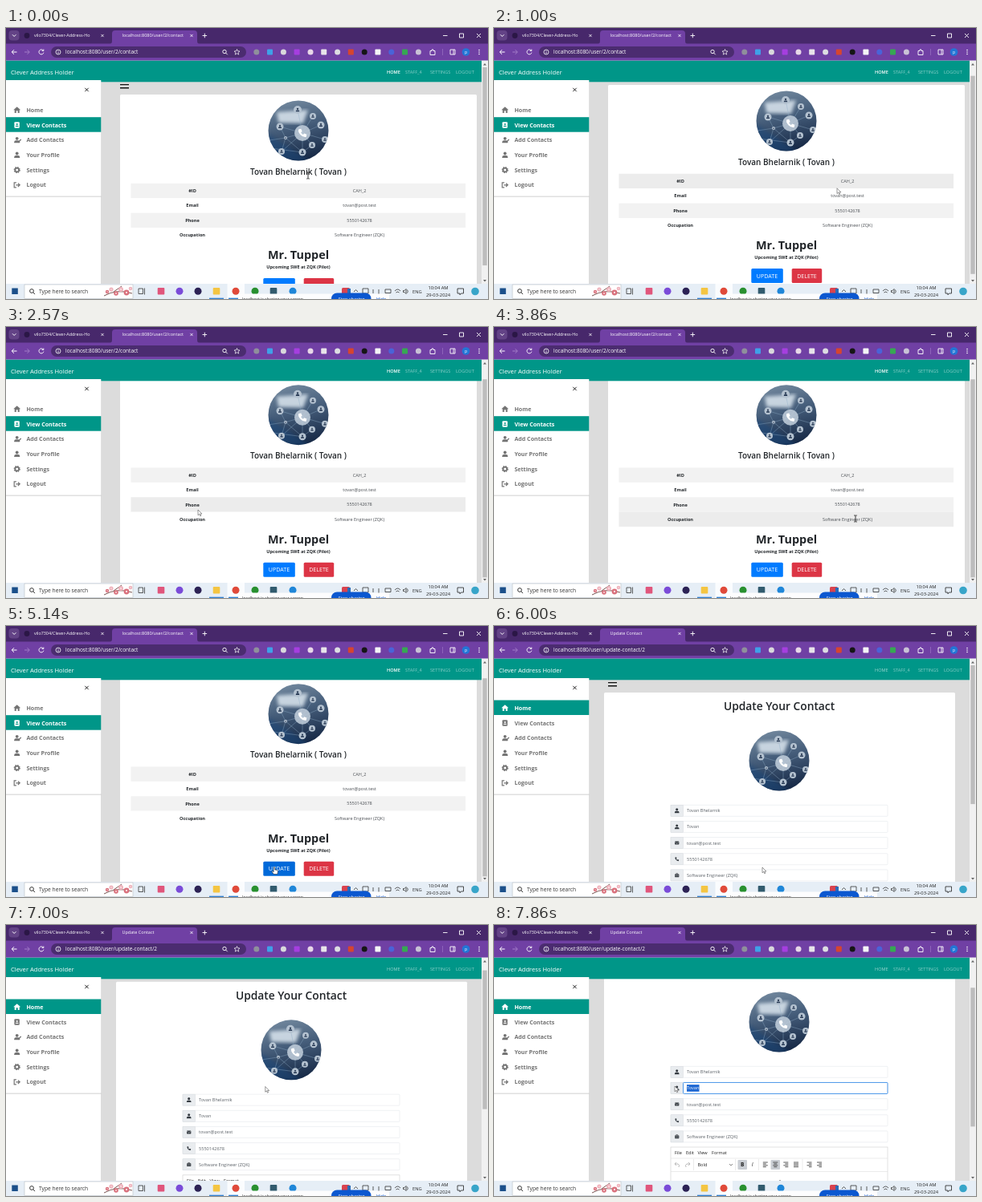
Write an HTML page that moves like this. It is 600 px wide and 338 px high and loops after 8 s.

```html
<!DOCTYPE html>
<html lang="en">
<head>
<meta charset="utf-8">
<title>Contact pages</title>
<style>
html, body { margin: 0; width: 100%; height: 100%; overflow: hidden; background: #fff; }
svg { display: block; width: 100%; height: 100%; }
text { font-family: "Open Sans", "Noto Sans", sans-serif; white-space: pre; }
</style>
</head>
<body>
<svg id="stage" viewBox="0 0 600 338"></svg>
<script>
const TEAL = '#009688', INK = '#212529', FRAME = '#47286b', BAR = '#7040a4';
const PERSON = { name: 'Tovan Bhelarnik', nick: 'Tovan', mail: 'tovan@post.test', phone: '5550142678', job: 'Software Engineer (ZQK)' };

// ---- drawing helpers ----
const rect = (x, y, w, h, fill, extra = '') => `<rect x="${x}" y="${y}" width="${w}" height="${h}" fill="${fill}" ${extra}/>`;
const disc = (x, y, r, fill, extra = '') => `<circle cx="${x}" cy="${y}" r="${r}" fill="${fill}" ${extra}/>`;
const line = (d, color, width = 0.8) => `<path d="${d}" fill="none" stroke="${color}" stroke-width="${width}"/>`;
const shape = (d, fill, extra = '') => `<path d="${d}" fill="${fill}" ${extra}/>`;
// y is the middle of the capitals
const text = (x, y, s, size, fill = INK, weight = 400, anchor = 'start', extra = '') =>
  `<text x="${x}" y="${(y + size * 0.36).toFixed(2)}" font-size="${size}" fill="${fill}" font-weight="${weight}" text-anchor="${anchor}" ${extra}>${s}</text>`;
const mid = (x, y, s, size, fill, weight) => text(x, y, s, size, fill, weight, 'middle');
const group = (id, body, extra = '') => `<g id="${id}" ${extra}>${body}</g>`;
const cross = (x, y, r, color, w) => line(`M${x - r} ${y - r}l${2 * r} ${2 * r}m0 ${-2 * r}l${-2 * r} ${2 * r}`, color, w);
const lens = (x, y, r, color) => line(`M${x - r} ${y}a${r} ${r} 0 1 0 ${2 * r} 0a${r} ${r} 0 1 0 ${-2 * r} 0M${x + r * 0.7} ${y + r * 0.7}l${r} ${r}`, color, 0.9);

const icons = {
  home: c => shape('M-4.5 0L0-4L4.5 0H3V3.7H1V1H-1V3.7H-3V0Z', c),
  book: c => {
    const inner = c === '#fff' ? TEAL : '#fff';
    return rect(-3.3, -3.8, 6.4, 7.6, c, 'rx="1"') + disc(0, -1, 1.1, inner) + rect(-1.8, 0.7, 3.6, 1.4, inner, 'rx=".7"');
  },
  person: c => disc(0, -1.9, 1.9, c) + shape('M-3.5 3.6V2.6Q-3.5.6-1.5.6H1.5Q3.5.6 3.5 2.6V3.6Z', c),
  edit: c => icons.person(c) + line('M1.5 3L5-.8', c, 1.4),
  gear: c => disc(0, 0, 2.4, 'none', `stroke="${c}" stroke-width="1.8"`) + disc(0, 0, 3.5, 'none', `stroke="${c}" stroke-width="1.3" stroke-dasharray="1.4 1.35"`),
  exit: c => line('M-.8-3H-3.5V3H-.8M-1.5 0H3M1.2-2.2L3.5 0L1.2 2.2', c, 1.2),
  mail: c => rect(-3.3, -2.5, 6.6, 5, c, 'rx=".6"') + line('M-3.3-1.5L0 .8L3.3-1.5', '#e9ecef', 0.6),
  phone: c => shape('M-2.7-2.8L-1-3.1L-.2-1.2L-1.1-.4Q-.5 .8.5 1.2L1.3.3L3.1 1.1L2.8 2.8Q1 3.6-1.4 1.3Q-3.6-1-2.7-2.8Z', c),
  job: c => rect(-3.3, -1.9, 6.6, 4.7, c, 'rx=".6"') + line('M-1.2-1.9V-2.9H1.2V-1.9', c) + line('M-3.3.6H3.3', '#e9ecef', 0.5),
};
const icon = (name, x, y, color, scale = 1) => `<g transform="translate(${x} ${y}) scale(${scale})">${icons[name](color)}</g>`;

// ---- profile picture: soft blue network, centred on 0,0 ----
function portrait(x, y) {
  const nodes = [[-1, -26, 5], [18, -18, 4], [28, -7, 4.5], [-23, -5, 4.5], [33, 11, 4], [17, 18, 4], [5, 27, 4.5], [-21, 26, 4], [-16, 9, 2]];
  const links = nodes.map(([a, b]) => `M5 3L${a} ${b}`).join('') + 'M-36 12L-16 9L5 27L17 18M-23-5L-16 9L-21 26M-34 22L5 27';
  return `<g transform="translate(${x} ${y})" clip-path="url(#round)">` +
    rect(-38, -38, 76, 76, 'url(#night)') +
    shape('M-27-23L12-26L6-9L-25-10Z', '#dbe6ef', 'opacity=".85" filter="url(#soft)"') +
    shape('M-38 4L14 38H-38Z', '#1d4a7c', 'opacity=".55" filter="url(#soft)"') +
    line(links, '#8fabc6', 0.4) +
    nodes.map(([a, b, r]) => disc(a, b, r, '#b4c2d0') + icon('person', a, b, '#2a3c57', r / 8)).join('') +
    disc(5, 3, 10, '#c3d0dd', 'opacity=".85"') + icon('phone', 5, 3, '#fff', 1.7) + '</g>';
}
const hamburger = line('M142 70.6H153M142 74.8H153', '#111', 1.4);

// ---- pages ----
const ROW = 18.4, ROWS_TOP = 193.8;
function contactPage() {
  const rows = [['#ID', 'CAH_2'], ['Email', PERSON.mail], ['Phone', PERSON.phone], ['Occupation', PERSON.job]];
  const table = rows.map(([head, value], i) => {
    const y = ROWS_TOP + i * ROW, fill = i % 2 ? '#fff' : '#f2f2f2';
    return rect(155.5, y, 416.5, ROW, fill, `class="row" data-fill="${fill}"`) +
      mid(232, y + 9.2, head, 5.6, INK, 700) + mid(440, y + 9.2, value, 5.5, '#4b4f54');
  }).join('');
  return rect(118, 60, 474, 300, '#dcdcdc') + hamburger + rect(142, 83, 444, 280, '#fff', 'rx="1.5"') +
    portrait(364, 128) + mid(364, 179, `${PERSON.name} ( ${PERSON.nick} )`, 10, INK, 600) + table +
    mid(364, 283, 'Mr. Tuppel', 14.4, INK, 700) +
    mid(364, 298.3, 'Upcoming SWE at ZQK (Pilot)', 5.6, INK, 700) +
    rect(320.3, 312, 39.5, 18, '#007bff', 'id="update" rx="1.5"') + mid(340, 321, 'UPDATE', 7.1, '#fff') +
    rect(370.7, 312, 37.5, 18, '#dc3545', 'rx="1.5"') + mid(389.5, 321, 'DELETE', 7.1, '#fff');
}

function updatePage() {
  const fields = [['person', PERSON.name], ['person', PERSON.nick], ['mail', PERSON.mail], ['phone', PERSON.phone], ['job', PERSON.job]];
  const inputs = fields.map(([name, value], i) => {
    const y = 230.3 + i * 20.15;
    return rect(220, y - 7, 270, 14, '#fff', 'rx="1" stroke="#dfe3e7" stroke-width=".5"') +
      rect(220, y - 7, 15.5, 14, '#e9ecef', 'stroke="#d5dade" stroke-width=".5"') +
      icon(name, 227.7, y, '#343a40', 0.8) + text(240, y, value, 5.6, '#5c6268');
  }).join('');
  const y = 250.45;
  const focus = group('focus', rect(235.5, y - 7, 254.5, 14, 'none', 'rx="1" stroke="#4c97ea" stroke-width="1"') +
    rect(240, y - 4.3, 0, 8.6, '#1b66d2', 'class="selection"') +
    text(240, y, PERSON.nick, 5.6, '#fff', 400, 'start', 'clip-path="url(#selected)"'));
  const bars = (x, short) => line([0, 1, 2, 3].map(i => `M${x + (i % 2 ? short[0] : 0)} ${343 + i * 1.9}h${i % 2 ? short[1] : 6}`).join(''), '#333', 0.8);
  const divider = x => line(`M${x} 339V353`, '#ddd', 0.6);
  const editor = rect(220, 324, 270, 70, '#fff', 'stroke="#ccc" stroke-width=".6"') +
    [['File', 225], ['Edit', 239], ['View', 253.5], ['Format', 271]].map(([s, x]) => text(x, 331.3, s, 5.6, '#222')).join('') +
    line('M220 338H490M220 354.5H490', '#ddd', 0.6) +
    line('M227 343L225 345L227 347M225 345H229Q231.5 346 230 349M242 343L244 345L242 347M244 345H240Q237.5 346 239 349', '#aaa', 0.8) +
    divider(248.5) + text(253.5, 346, 'Bold', 5.6, '#222') + line('M293 345l2 2l2-2', '#666', 0.8) + divider(300.5) +
    rect(303.5, 340, 11.5, 12, '#c9cdd3', 'rx="1"') + mid(309.3, 346, 'B', 6.5, '#222', 700) +
    text(321.7, 346, 'I', 6.5, '#222', 400, 'middle', 'font-style="italic"') + divider(329.5) +
    rect(344.5, 340, 11.5, 12, '#c9cdd3', 'rx="1"') +
    bars(334.8, [0, 4]) + bars(347.3, [1, 4]) + bars(360.3, [2, 4]) + bars(373, [0, 6]) + divider(384) +
    bars(389.5, [2.5, 3.5]) + bars(402, [2.5, 3.5]) + disc(356, 365.5, 0.6, '#333');
  return rect(118, 60, 474, 400, '#dcdcdc') + hamburger + rect(137, 83, 437, 360, '#fff', 'rx="1.5"') +
    mid(355, 100.5, 'Update Your Contact', 13.8, INK, 600) + portrait(355, 168) + inputs + focus + editor;
}

function sidebar(active) {
  const items = [['home', 'Home'], ['book', 'View Contacts'], ['edit', 'Add Contacts'], ['person', 'Your Profile'], ['gear', 'Settings'], ['exit', 'Logout']];
  return rect(0, 65, 118.3, 144.5, '#fff', 'filter="url(#shadow)"') + cross(100.5, 77, 2.2, '#222', 1) +
    items.map(([name, label], i) => {
      const y = 102.3 + i * 18.7, color = i === active ? '#fff' : '#747474';
      return (i === active ? rect(0, y - 9.8, 118.3, 18.5, TEAL) : '') + icon(name, 13.7, y, color) + text(25.4, y, label, 7.1, color, 700);
    }).join('');
}

function navbar(homeColor) {
  const dim = 'rgba(255,255,255,.55)';
  return rect(0, 40.5, 592, 26.8, TEAL) + text(6, 55.2, 'Clever Address Holder', 7.6, '#fff') +
    text(474, 55, 'HOME', 5.6, homeColor, homeColor === '#fff' ? 600 : 400) +
    text(497, 55, 'STAFF_4', 5.6, dim) + text(528, 55, 'SETTINGS', 5.6, dim) + text(560, 55, 'LOGOUT', 5.6, dim);
}

// ---- browser and desktop ----
function browser(title, url) {
  const extensions = ['#8f8f9c', '#3fa0e8', '#d9d9dc', '#a63ee0', '#e8d8e8', '#e8e4ea', '#dddde2', '#d6452f', '#151515', '#f4f4f6', '#4a63d8', '#36a853', '#c9c2d6'];
  return rect(0, 0, 600, 21, FRAME) + rect(0, 19.5, 600, 21, BAR) +
    rect(3.5, 3, 13, 12.5, '#634386', 'rx="4"') + line('M8 8.3l2.2 2.2l2.2-2.2', '#fff', 1) +
    disc(26, 9.5, 3.4, '#2b1746') + text(35, 9.5, 'vilo7304/Clever-Address-Ho', 5.4, '#fff') + cross(120, 9.5, 1.6, '#fff', 0.8) +
    shape('M129 20Q132 20 132 16V7Q132 3 136 3H234Q238 3 238 7V16Q238 20 241 20Z', BAR) +
    text(144.5, 9.5, title, 5.5, '#fff') + cross(231, 9.5, 1.6, '#fff', 0.8) +
    line('M244.5 9.5h5.6m-2.8-2.8v5.6M544 9.5h5.5M564.5 7h5v5h-5z', '#fff', 0.9) + cross(588.5, 9.5, 2.5, '#fff', 0.9) +
    line('M13.5 30H7.5M10 27.2L7.2 30L10 32.8', '#fff', 1) + line('M23 30H29M26.5 27.2L29.3 30L26.5 32.8', '#a27bc8', 1) +
    line('M46.3 28a3 3 0 1 0 .6 2.6M46.8 26.5V28.5H44.8', '#fff', 0.9) +
    rect(56, 23, 243, 14, '#4b2c70', 'rx="7"') + disc(65, 30, 3, 'none', 'stroke="#fff" stroke-width=".8"') + line('M65 29.5V32M65 28v.8', '#fff', 0.8) +
    text(74, 30, url, 6.5, '#fff') + lens(272, 29.5, 2.2, '#fff') +
    line('M287.5 26.5l1 2.3l2.5.2l-1.9 1.6l.6 2.5l-2.2-1.4l-2.2 1.4l.6-2.5l-1.9-1.6l2.5-.2z', '#fff', 0.7) +
    extensions.map((c, i) => i % 2 ? rect(325 + (i - 1) * 16.8, 26.5, 7, 7, c, 'rx="1"') : disc(311.8 + i * 16.8, 30, 3.5, c)).join('') +
    line('M528 28.5h2v-1.5h2v1.5h2v5h-6zM553 27h6v6h-6zM557 27v6', '#fff', 0.9) + line('M543.5 26V34', '#a27bc8', 0.6) +
    disc(572.5, 30, 4.8, '#2376d6') + mid(572.5, 30, 'p', 5, '#fff') + [27.5, 30, 32.5].map(y => disc(589, y, 0.8, '#fff')).join('');
}

function taskbar() {
  const apps = [[193, '#e0567c'], [216, '#7a4bd8'], [239, '#2c2255'], [262, '#f4c542'], [286, '#e04a3a'], [310, '#28902f'], [333, '#315b6e'], [357, '#1f86d8']];
  const blossoms = [[126, 329, 2.2], [131, 326, 2.6], [137, 331, 2.8], [143, 326, 3], [150, 330, 3.4], [155, 325, 2.3]];
  return rect(0, 319, 600, 19, '#e6eef6') + rect(7.3, 324.5, 7.5, 7.5, '#1b4f8a') +
    rect(23, 320, 135, 17.5, '#fff', 'stroke="#b9bec4" stroke-width=".6"') + lens(32, 328, 2.4, '#222') + text(41, 328.7, 'Type here to search', 6.7, '#333') +
    line('M122 334Q138 325 157 331M134 329L144 322', '#6b4340', 0.9) +
    blossoms.map(([x, y, r], i) => disc(x, y, r, i % 2 ? '#efb3bc' : '#d9707c') + disc(x, y, r / 3, '#fbe1e3')).join('') +
    line('M165 325h5.5v6.5h-5.5zM172.5 324.5v8', '#333', 0.8) + rect(275.5, 319, 21.5, 19, '#fafcfe') +
    apps.map(([x, c], i) => (i % 3 === 0 ? rect(x - 4.3, 324, 8.6, 8.5, c, 'rx="1"') : disc(x, 328.3, 4.5, c)) +
      (i > 2 ? rect(x - 9, 336.7, 18, 1.3, '#2f7fd0') : '')).join('') +
    rect(418, 324, 10, 8, '#d9434f', 'rx="1.5"') + rect(425, 325, 4, 7, '#2a6cb8') +
    line('M433 329l2.5-2.5l2.5 2.5M444 325h7v6h-7zM457 326v5M464 326v6M472 326h7v4.5h-7z', '#333', 0.8) +
    line('M484 328q3.5-4 7 0M485.5 330q2-2 4 0M494.5 327.5h1.5l2-2v6l-2-2h-1.5zM499.5 326.5q1.5 2 0 4', '#333', 0.8) +
    text(506, 328.5, 'ENG', 5.7, '#222') + mid(538, 324, '10:04 AM', 5.8, '#222') + mid(538, 333.4, '29-03-2024', 5.8, '#222') +
    line('M562 325h7.5v6h-3l-1.5 1.8v-1.8h-3z', '#222', 0.8) + disc(584, 328.5, 4.8, '#38a5c9') +
    rect(289, 331.5, 188, 10, '#fdfdfe', 'rx="2"') + text(294, 337.7, 'localhost is sharing your screen.', 5.2, '#333') +
    rect(405, 330.5, 49.5, 14, '#0b57d0', 'rx="7"') + mid(430, 338, 'Stop sharing', 5.6, '#fff') + text(461, 338, 'Hide', 5.6, '#0b57d0');
}

const cursors = {
  arrow: shape('M0 0V6.8L1.6 5.3L2.7 7.8L3.8 7.3L2.7 5H4.9Z', '#fff', 'stroke="#555" stroke-width=".6"'),
  beam: line('M-1.8-4H-.4L0-3.6L.4-4H1.8M0-3.6V3.6M-1.8 4H-.4L0 3.6L.4 4H1.8', '#222', 0.9),
  hand: shape('M-.8 0Q0-1 .8 0V3L3.6 3.7Q4.6 4 4.4 5.5L3.8 8.5H-.8L-3 5.3Q-2.8 4.3-1.7 5L-.8 5.7Z', '#fff', 'stroke="#333" stroke-width=".6"'),
};

// ---- scene ----
const stage = document.getElementById('stage');
stage.innerHTML = `<defs>
  <clipPath id="round"><circle r="37.5"/></clipPath>
  <clipPath id="view"><rect x="0" y="67" width="592" height="252"/></clipPath>
  <clipPath id="selected"><rect class="selection" x="240" y="244" width="0" height="13"/></clipPath>
  <linearGradient id="night" x1=".35" y1="0" x2=".6" y2="1"><stop stop-color="#71879d"/><stop offset=".45" stop-color="#445c79"/><stop offset="1" stop-color="#152744"/></linearGradient>
  <filter id="soft"><feGaussianBlur stdDeviation="2"/></filter>
  <filter id="shadow"><feDropShadow dx="0" dy=".8" stdDeviation=".6" flood-opacity=".3"/></filter>
</defs>` + rect(0, 0, 600, 338, '#fff') +
  `<g clip-path="url(#view)">${group('contactBody', contactPage())}${group('updateBody', updatePage())}</g>` +
  rect(592, 40.5, 8, 278.5, '#f1f1f1') + rect(593.3, 49, 5.4, 100, '#bdbdbd', 'id="thumb"') +
  shape('M594 46.5L596 44L598 46.5ZM594 314L596 316.5L598 314Z', '#666') +
  group('contactChrome', navbar('#fff') + sidebar(1) + browser('localhost:8080/user/2/contact', 'localhost:8080/user/2/contact')) +
  group('updateChrome', navbar('rgba(255,255,255,.6)') + sidebar(0) + browser('Update Contact', 'localhost:8080/user/update-contact/2')) +
  taskbar() + group('pointer', Object.entries(cursors).map(([id, body]) => group(id, body)).join(''));

// ---- motion ----
const LOOP = 8000, STEP = 1000 / 7, PAGE_SWITCH = 6000;
const scrollContact = [[857, 0], [1000, 12], [1143, 18.3]];
const scrollUpdate = [[6857, 0], [7290, 47]];
const pointerPath = [
  [0, 376, 184, 'beam'], [570, 376, 184, 'arrow'], [1000, 427, 199.8, 'arrow'], [1700, 350, 206, 'arrow'],
  [2571, 239, 228, 'arrow'], [3000, 262, 234, 'arrow'], [3700, 450, 239, 'beam'], [4290, 450, 239, 'beam'],
  [4570, 420, 262, 'arrow'], [5000, 334, 301, 'hand'], [6000, 334, 301, 'arrow'], [6714, 325, 200, 'arrow'],
  [7143, 322, 202, 'beam'], [7430, 262, 203, 'beam'], [7850, 225, 201, 'arrow'],
];

// Eased value of one column of a key list at time t
function at(keys, t, column = 1) {
  const next = keys.findIndex(k => k[0] > t);
  if (next < 0) return keys[keys.length - 1][column];
  if (next === 0) return keys[0][column];
  const a = keys[next - 1], b = keys[next], p = (t - a[0]) / (b[0] - a[0]);
  return a[column] + (b[column] - a[column]) * p * p * (3 - 2 * p);
}
const el = id => document.getElementById(id);
const show = (id, on) => el(id).setAttribute('display', on ? 'inline' : 'none');
const shift = (id, x, y) => el(id).setAttribute('transform', `translate(${x.toFixed(2)} ${y.toFixed(2)})`);
const tableRows = [...document.querySelectorAll('.row')];
const selections = [...document.querySelectorAll('.selection')];

function draw(time) {
  const t = Math.floor((time % LOOP + 5) / STEP) * STEP + 1;
  const updating = t >= PAGE_SWITCH;
  const scroll = at(updating ? scrollUpdate : scrollContact, t);
  const x = at(pointerPath, t, 1), y = at(pointerPath, t, 2);

  for (const part of ['Body', 'Chrome']) {
    show('contact' + part, !updating);
    show('update' + part, updating);
  }
  shift(updating ? 'updateBody' : 'contactBody', 0, -scroll);

  const track = 264, content = updating ? 424 : 297;
  el('thumb').setAttribute('y', 49 + scroll * track / content);
  el('thumb').setAttribute('height', track * 278 / content);

  const hovered = Math.floor((y + scroll - ROWS_TOP) / ROW);
  tableRows.forEach((row, i) => row.setAttribute('fill', i === hovered ? '#ececec' : row.dataset.fill));
  el('update').setAttribute('fill', y > 293 ? '#0069d9' : '#007bff');

  show('focus', t > 7430);
  const left = Math.min(255.5, Math.max(240, x));
  for (const box of selections) {
    box.setAttribute('x', left);
    box.setAttribute('width', 255.5 - left);
  }

  const kind = pointerPath.filter(k => k[0] <= t).pop()[3];
  for (const id in cursors) show(id, id === kind);
  shift('pointer', x, y);
}

const start = performance.now();
function tick() {
  draw(performance.now() - start);
  requestAnimationFrame(tick);
}
tick();
</script>
</body>
</html>
```
